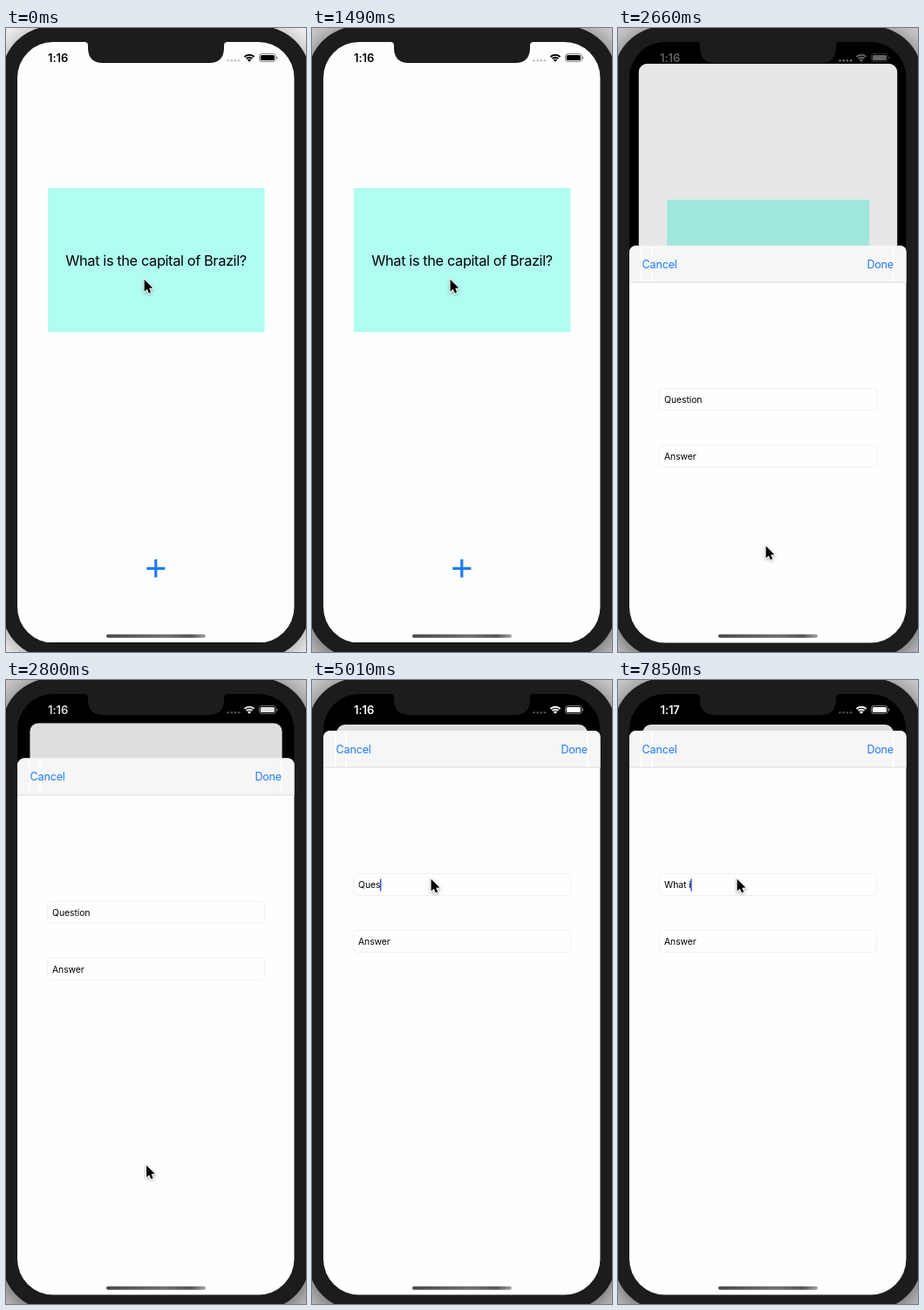
Animation, 344 px wide and 714 px high, one loop 8 s. Source, as an HTML page with a canvas:

```html
<!DOCTYPE html>
<html lang="en">
<head>
<meta charset="utf-8">
<title>Flashcards</title>
<style>
  html, body { margin: 0; width: 344px; height: 714px; overflow: hidden; }
  canvas { display: block; }
</style>
</head>
<body>
<canvas id="stage" width="344" height="714"></canvas>
<script>
const LOOP = 8000;
const BEZEL = '#1c1c1c';
const BLUE = '#1f7bf4';
const ctx = document.getElementById('stage').getContext('2d');

// [time, text] of the question field
const typing = [
  [0, 'Question'], [4420, 'Questio'], [4860, 'Quest'], [5010, 'Ques'],
  [5160, 'Que'], [5300, 'Q'], [5450, ''], [6050, 'W'], [6200, 'Wh'],
  [6350, 'Wha'], [6500, 'What'], [6650, 'What '], [6800, 'What o'],
  [6950, 'What os'], [7100, 'What o'], [7250, 'What'], [7400, 'What '],
  [7850, 'What i']
];

// [start, end, number of steps, from x, from y, to x, to y]
const moves = [
  [1490, 2360, 6, 158, 287, 169, 611],
  [2660, 3390, 5, 169, 592, 86.5, 231],
  [3695, 4270, 4, 86.5, 231, 136, 227]
];

const lerp = (a, b, p) => a + (b - a) * p;
const smooth = p => p * p * (3 - 2 * p);
const grey = v => `rgb(${v},${v},${v})`;

// Progress from 0 to 1 in n equal jumps
function stepped(t, start, end, n) {
  const k = Math.floor((t - start) / (end - start) * n + 0.05);
  return Math.max(0, Math.min(n, k)) / n;
}

function box(x, y, w, h, r, fill, stroke) {
  ctx.beginPath();
  ctx.roundRect(x, y, w, h, r);
  if (fill) { ctx.fillStyle = fill; ctx.fill(); }
  if (stroke) { ctx.strokeStyle = stroke; ctx.lineWidth = 1; ctx.stroke(); }
}

function text(str, x, y, size, color, spacing = 0, align = 'left', weight = 400) {
  ctx.font = `${weight} ${size}px Inter, "Liberation Sans", sans-serif`;
  ctx.letterSpacing = spacing + 'px';
  ctx.textAlign = align;
  ctx.fillStyle = color;
  ctx.fillText(str, x, y);
  return ctx.measureText(str).width;
}

function drawBody(focused) {
  ctx.fillStyle = focused ? '#d4d4d4' : '#eeeeee';
  ctx.fillRect(0, 0, 344, 714);
  ctx.save();
  ctx.shadowColor = focused ? 'rgba(0,0,0,.65)' : 'rgba(0,0,0,.35)';
  ctx.shadowBlur = focused ? 36 : 22;
  ctx.shadowOffsetY = focused ? 6 : 3;
  box(-5, -2, 354, 723, 58, BEZEL);
  ctx.restore();
}

function drawNotch() {
  ctx.beginPath();
  ctx.moveTo(88, 15);
  ctx.lineTo(90, 16);
  ctx.quadraticCurveTo(94, 16, 94, 20);
  ctx.lineTo(94, 24);
  ctx.quadraticCurveTo(95, 40, 111, 40);
  ctx.lineTo(233, 40);
  ctx.quadraticCurveTo(249, 40, 250, 24);
  ctx.lineTo(250, 20);
  ctx.quadraticCurveTo(250, 16, 254, 16);
  ctx.lineTo(256, 15);
  ctx.fillStyle = BEZEL;
  ctx.fill();
}

function drawStatus(t, p) {
  const color = grey(Math.round(255 * p ** 2.7));
  text(t < 6200 ? '1:16' : '1:17', 59.6, 38.6, 13, color, -0.1, 'center', 600);

  ctx.fillStyle = grey(Math.round(lerp(190, 75, p)));
  for (let i = 0; i < 4; i++) {
    ctx.beginPath();
    ctx.arc(254.5 + i * 4.2, 37.3, 1.3, 0, 7);
    ctx.fill();
  }

  ctx.strokeStyle = ctx.fillStyle = color;
  ctx.lineWidth = 1.9;
  for (const r of [7.9, 4.9]) {
    ctx.beginPath();
    ctx.arc(279, 38.6, r, -Math.PI * 0.75, -Math.PI * 0.25);
    ctx.stroke();
  }
  ctx.beginPath();
  ctx.moveTo(279, 38.8);
  ctx.arc(279, 38.8, 3, -Math.PI * 0.75, -Math.PI * 0.25);
  ctx.fill();

  ctx.globalAlpha = 0.5;
  box(290.5, 29.6, 18.6, 8.8, 2.6, null, color);
  box(310, 32.4, 1.2, 3.2, 0.6, color);
  ctx.globalAlpha = 1;
  box(291.8, 30.9, 16, 6.2, 1.5, color);
}

function drawHome(t, p) {
  const scale = lerp(1, 288 / 318, p);
  const flipped = t >= 290 && t < 1490;
  ctx.save();
  ctx.translate(lerp(13, 28, p), lerp(16, 51, p));
  ctx.scale(scale, scale);
  ctx.translate(-13, -16);
  ctx.beginPath();
  ctx.roundRect(13, 16, 318, 687, p ? 11 : 0);
  ctx.clip();
  ctx.fillStyle = '#fefefe';
  ctx.fillRect(13, 16, 318, 687);
  ctx.fillStyle = flipped ? '#5c9088' : '#b0fef1';
  ctx.fillRect(48, 183, 248.5, 165);
  if (flipped) text('Brasilia', 172, 272, 16.4, '#fff', -0.4, 'center');
  else text('What is the capital of Brazil?', 172, 272, 16.4, '#000', -0.4, 'center');
  ctx.fillStyle = BLUE;
  ctx.fillRect(161.3, 616.8, 21, 3.2);
  ctx.fillRect(170.2, 608, 3.2, 20.6);
  ctx.fillStyle = `rgba(0,0,0,${0.13 * p})`;
  ctx.fillRect(13, 16, 318, 687);
  ctx.restore();
}

function drawField(str, y, caret) {
  box(47.5, y, 249, 25, 4, '#fefefe', '#f0f0f0');
  const w = text(str, 53, y + 16.7, 10.4, '#000', -0.06);
  if (caret) {
    ctx.fillStyle = '#3d62d8';
    ctx.fillRect(53 + w - 0.5, y + 6, 1.6, 14);
  }
}

function drawSheet(t, p) {
  ctx.save();
  ctx.translate(0, lerp(703, 58, p));
  box(13, 0, 318, 720, 8, '#fefefe');
  box(13, 0, 318, 42, [8, 8, 0, 0], '#f6f6f6');
  ctx.fillStyle = '#fefefe';
  for (const x of [26, 37.8, 315]) ctx.fillRect(x, 1, 2, 41);
  ctx.fillStyle = '#dcdcdc';
  ctx.fillRect(13, 41.5, 318, 1);
  text('Cancel', 27.6, 25.7, 12.6, BLUE, -0.2);
  text('Done', 316, 25.7, 12.6, BLUE, -0.2, 'right');
  const str = typing.findLast(([start]) => t >= start)[1];
  drawField(str, 163.5, t >= 4130);
  drawField('Answer', 228.5, false);
  ctx.restore();
}

function drawHomeBar() {
  const g = ctx.createLinearGradient(115, 0, 229, 0);
  g.addColorStop(0, '#4a4a4a');
  g.addColorStop(0.6, '#707070');
  g.addColorStop(0.85, '#555');
  g.addColorStop(1, '#a5a5a5');
  box(115, 693.8, 114, 4, 2, g);
}

function drawCursor(t) {
  const [start, end, n, x0, y0, x1, y1] = moves.findLast(m => t >= m[0]) || moves[0];
  const p = smooth(stepped(t, start, end, n));
  ctx.save();
  ctx.translate(lerp(x0, x1, p), lerp(y0, y1, p));
  ctx.beginPath();
  ctx.moveTo(0.6, 0.8);
  for (const [x, y] of [[0.6, 14.6], [3.8, 11.7], [5.9, 16.6], [8.2, 15.6], [6.2, 10.8], [10.4, 10.6]])
    ctx.lineTo(x, y);
  ctx.closePath();
  ctx.shadowColor = 'rgba(0,0,0,.35)';
  ctx.shadowBlur = 3;
  ctx.shadowOffsetY = 1;
  ctx.strokeStyle = '#fff';
  ctx.lineWidth = 2;
  ctx.stroke();
  ctx.shadowColor = 'transparent';
  ctx.fillStyle = '#000';
  ctx.fill();
  ctx.restore();
}

// How far the sheet is open: it settles exponentially in steps
function sheetProgress(t) {
  if (t < 2660) return 0;
  const k = Math.round(stepped(t, 2660, 3390, 5) * 5);
  return k > 2 ? 1 : 1 - 0.296 * Math.exp(-1.8 * k);
}

function draw(t) {
  const p = sheetProgress(t);
  drawBody(t >= 140);
  ctx.save();
  ctx.beginPath();
  ctx.roundRect(13, 16, 317.5, 687.5, 41);
  ctx.clip();
  ctx.fillStyle = '#000';
  ctx.fillRect(13, 16, 318, 688);
  drawHome(t, p);
  drawStatus(t, p);
  if (p) drawSheet(t, p);
  drawHomeBar();
  ctx.restore();
  drawNotch();
  drawCursor(t);
}

let origin;
function frame(now) {
  origin ??= now;
  draw((now - origin) % LOOP);
  requestAnimationFrame(frame);
}
requestAnimationFrame(frame);
</script>
</body>
</html>
```
